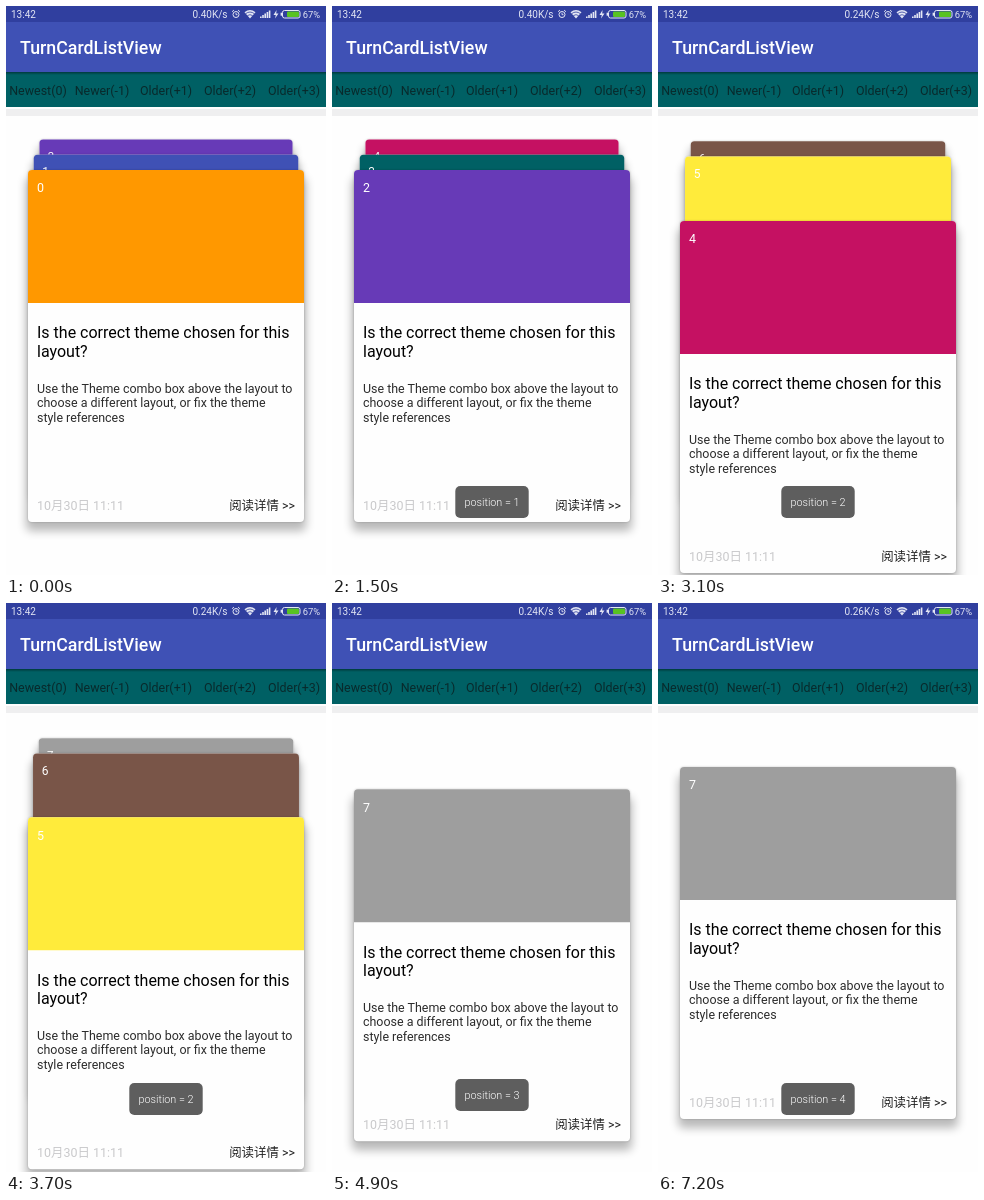
An HTML page that plays this animation: 320x569 px, repeating every 8 s.

```html
<!DOCTYPE html>
<html lang="en">
<head>
<meta charset="utf-8">
<title>TurnCardListView</title>
<style>
html, body { margin: 0; width: 100%; height: 100%; overflow: hidden; background: #fff; }
svg { display: block; width: 100%; height: 100%; }
text { font-family: Roboto, "Noto Sans CJK SC", "Noto Sans CJK", sans-serif; font-size: 12.44px; }
.status text { font-size: 10px; fill: #e3e6f4; }
.tabs text { fill: #082a2c; text-anchor: middle; }
.head { font-size: 16px; }
.body { fill: #2c2c2c; }
</style>
</head>
<body>
<svg viewBox="0 0 320 569" preserveAspectRatio="none">
  <defs>
    <filter id="soft" x="-10%" y="-10%" width="120%" height="120%"><feGaussianBlur stdDeviation="4.6"/></filter>
    <filter id="edge" x="-5%" y="-5%" width="110%" height="110%"><feGaussianBlur stdDeviation="1.2"/></filter>
    <linearGradient id="fall" x2="0" y2="1">
      <stop offset="0" stop-opacity=".4"/><stop offset="1" stop-opacity="0"/>
    </linearGradient>
  </defs>
  <rect width="320" height="569" fill="#fefefe"/>
  <rect y="103" width="320" height="7" fill="#efeff0"/>
  <g class="tabs" id="tabs">
    <rect y="66" width="320" height="35" fill="#006064"/>
    <rect y="66" width="320" height="3" fill="url(#fall)"/>
  </g>
  <rect width="320" height="66" fill="#3f51b5"/>
  <rect width="320" height="16" fill="#303f9f"/>
  <text x="14" y="48" fill="#fff" style="font-size:17.78px;font-weight:500">TurnCardListView</text>
  <g class="status">
    <text x="5" y="12">13:42</text>
    <text x="221.5" y="12" text-anchor="end" id="speed"></text>
    <g fill="none" stroke="#e3e6f4">
      <circle cx="230" cy="8.5" r="3"/>
      <path d="M230 6.8V8.7H231.5M226 5.8L228 4M234 5.8L232 4" stroke-width=".9"/>
      <rect x="276.5" y="4.5" width="17.5" height="7.5" rx="2"/>
    </g>
    <path d="M238.5 6.2Q244 2 249.5 6.2L244 12.5Z" fill="#e3e6f4"/>
    <path d="M239.6 7.7Q244 4.4 248.4 7.7M241.4 9.6Q244 7.8 246.6 9.6" fill="none" stroke="#303f9f" stroke-width=".8"/>
    <path d="M254 12V10.5H255.6V12ZM256.2 12V9H257.8V12ZM258.4 12V7.5H260V12ZM260.6 12V6H262.2V12ZM262.8 12V4.5H264.4V12ZM270.6 4L267.5 9H269.8L269 12.5L272.5 7.4H270.2Z" fill="#e3e6f4"/>
    <rect x="281" y="5.5" width="12" height="5.5" rx="1" fill="#58c322"/>
    <rect x="274.6" y="6.7" width="1.4" height="3" fill="#e3e6f4"/>
    <text x="296.7" y="12" style="font-size:9.4px">67%</text>
  </g>
  <g id="cards"></g>
  <g id="toast">
    <rect x="123.3" y="480" width="73.4" height="32" rx="5" fill="#5e5e5e"/>
    <text x="160" y="500.3" text-anchor="middle" fill="#fff" style="font-size:10.8px;font-weight:300"></text>
  </g>
</svg>
<script>
const LOOP = 8000;
const COLORS = ["#ff9800", "#3f51b5", "#673ab7", "#006064", "#c51162", "#ffeb3b", "#795548", "#9e9e9e"];
const LAST = COLORS.length - 1;
// Start and length of the swipe that removes each card
const SWIPES = [[230, 590], [850, 630], [1640, 660], [2401, 460], [2980, 570], [3602, 470], [4160, 600]];
const PULL = { start: 4830, length: 670, reach: 68 };
const EXIT = 440;
// Start and end of each toast
const TOASTS = [[600, 2550], [2690, 4600], [4740, 6700], [6860, LOOP + 500]];

const $ = id => document.getElementById(id);
const clamp = v => Math.max(0, Math.min(1, v));
const smooth = u => u * u * (3 - 2 * u);
const backOut = u => 1 + 4.6 * (u - 1) ** 3 + 3.6 * (u - 1) ** 2;

["Newest(0)", "Newer(-1)", "Older(+1)", "Older(+2)", "Older(+3)"].forEach((label, i) =>
  $("tabs").insertAdjacentHTML("beforeend", `<text x="${32 + 64 * i}" y="88.5">${label}</text>`));

const cardMarkup = `<g>
  <rect x="-140" y="8" width="280" height="353" rx="5" opacity=".27" filter="url(#soft)"/>
  <rect x="-138" width="276" height="352" rx="4" opacity=".2" filter="url(#edge)"/>
  <rect x="-138" width="276" height="352" rx="4" fill="#fefefe"/>
  <path class="top" d="M-138 133V4Q-138 0 -134 0H134Q138 0 138 4V133Z"/>
  <text class="num" x="-129" y="22.3" fill="#fff"></text>
  <text class="head" x="-129" y="168.3">Is the correct theme chosen for this</text>
  <text class="head" x="-129" y="187">layout?</text>
  <text class="body" x="-129" y="222.5">Use the Theme combo box above the layout to</text>
  <text class="body" x="-129" y="237">choose a different layout, or fix the theme</text>
  <text class="body" x="-129" y="251.5">style references</text>
  <text x="-129" y="339.5" fill="#c9c9cb">10月30日 11:11</text>
  <text x="129" y="339.5" fill="#222" text-anchor="end">阅读详情 &gt;&gt;</text>
</g>`;
$("cards").innerHTML = cardMarkup.repeat(3);
const slots = [...$("cards").children].reverse().map(el => ({
  el, top: el.querySelector(".top"), num: el.querySelector(".num")
}));

function stackAt(t) {
  let front = 0;
  while (front < LAST && t >= SWIPES[front][0] + SWIPES[front][1]) front++;
  if (front === LAST) {
    const u = clamp((t - PULL.start) / PULL.length);
    return { front, drop: PULL.reach * Math.sin(Math.PI * u) };
  }
  const [start, length] = SWIPES[front];
  return { front, drop: EXIT * smooth(clamp((t - start) / length)) };
}

function drawCards(t) {
  const { front, drop } = stackAt(t);
  const progress = clamp(drop / 410);
  slots.forEach(({ el, top, num }, i) => {
    const n = front + i;
    el.style.display = n > LAST ? "none" : "";
    if (n > LAST) return;
    const depth = i ? i - progress : 0;
    const y = 164 - 15.3 * depth + (i ? 0 : drop);
    el.setAttribute("transform", `translate(160 ${y}) scale(${1 - 0.0415 * depth})`);
    top.setAttribute("fill", COLORS[n]);
    num.textContent = n;
  });
}

function drawToast(t) {
  const toast = $("toast");
  const i = TOASTS.findIndex(([a, b]) => t >= a && t < b + 150);
  toast.style.display = i < 0 ? "none" : "";
  if (i < 0) return;
  const [start, end] = TOASTS[i];
  const y = 12 * (1 - backOut(clamp((t - start) / 330)));
  toast.setAttribute("transform", `translate(0 ${y})`);
  toast.setAttribute("opacity", clamp((t - start) / 140) * (1 - clamp((t - end) / 150)));
  toast.lastElementChild.textContent = `position = ${i + 1}`;
}

function draw(t) {
  $("speed").textContent = (t < 1900 ? "0.40" : t < 5900 ? "0.24" : "0.26") + "K/s";
  drawCards(t);
  drawToast(t);
}

const origin = performance.now();
function tick() {
  draw((performance.now() - origin) % LOOP);
  requestAnimationFrame(tick);
}
tick();
</script>
</body>
</html>
```
